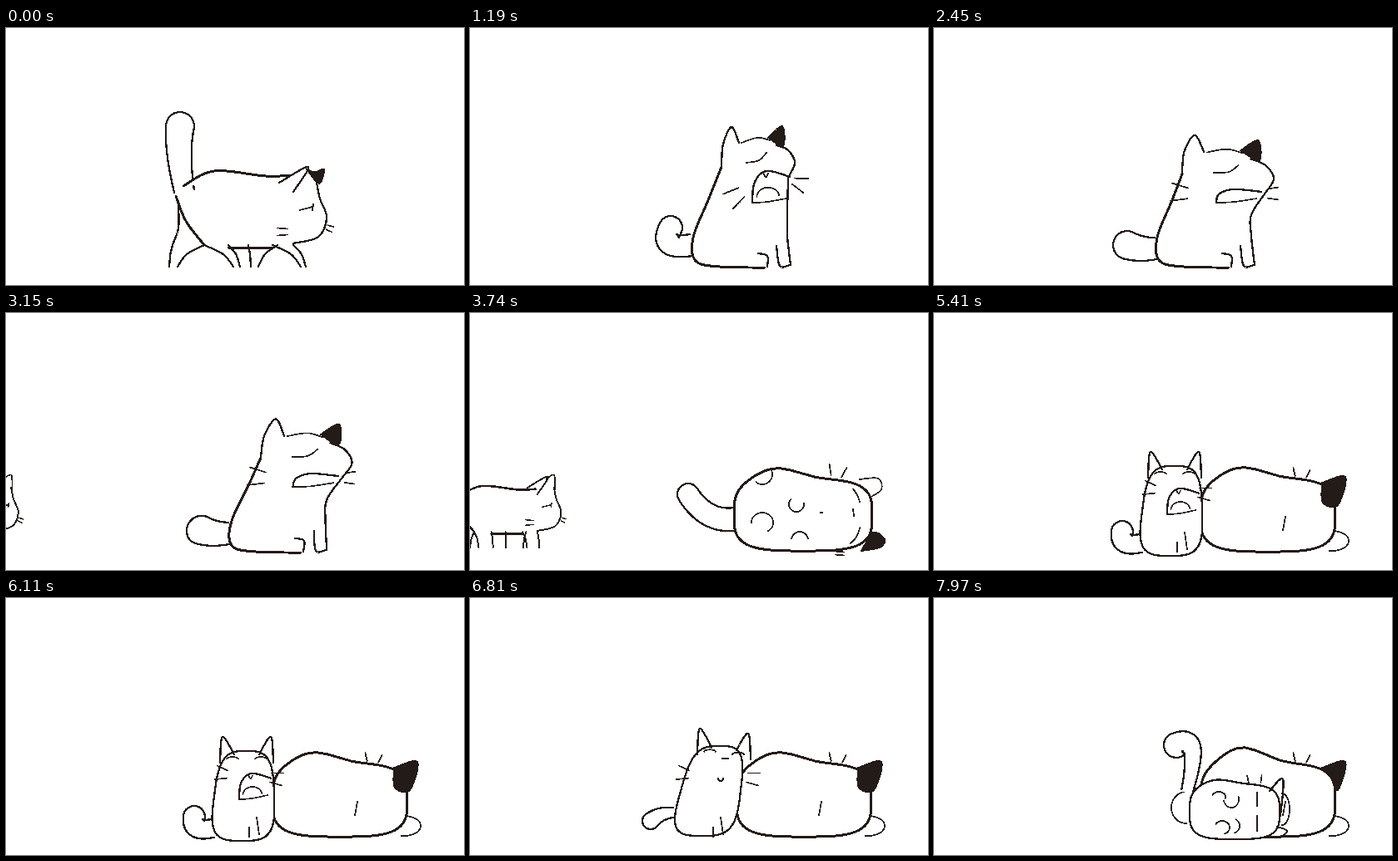
Write an HTML page that moves like this. It is 550 by 309 pixels and loops after 8000 ms.

```html
<!DOCTYPE html>
<html lang="en">
<head>
<meta charset="utf-8">
<title>Two sleepy cats</title>
<style>
html, body { margin: 0; width: 100%; height: 100%; overflow: hidden; background: #fff; }
svg { display: block; width: 100%; height: 100%; }
path { stroke: #231b18; stroke-linecap: round; stroke-linejoin: round; shape-rendering: crispEdges; }
</style>
</head>
<body>
<svg id="stage" viewBox="0 0 550 309"></svg>
<script>
const LOOP = 8000, STEP = 70, SAMPLES = 60, INK = '#231b18', FLOOR = 287;
const BOLD = 3, MID = 2.3, FINE = 1.7;
const stage = document.getElementById('stage');
const mix = (a, b, u) => a + (b - a) * u;
const rad = deg => deg * Math.PI / 180;

// A stroke is a line width plus evenly sampled points, so any two can blend
const stroke = (width, pointAt) =>
  ({ width, pts: Array.from({ length: SAMPLES + 1 }, (_, n) => pointAt(n / SAMPLES)) });

// Catmull-Rom curve through a few key points
function curve(width, ...keys) {
  const key = i => keys[Math.max(0, Math.min(keys.length - 1, i))];
  return stroke(width, v => {
    const s = v * (keys.length - 1), i = Math.min(Math.floor(s), keys.length - 2), u = s - i;
    return [0, 1].map(k => {
      const [a, b, c, d] = [-1, 0, 1, 2].map(o => key(i + o)[k]);
      return b + u / 2 * (c - a + u * (2 * a - 5 * b + 4 * c - d + u * (3 * (b - c) + d - a)));
    });
  });
}

const oval = (width, cx, cy, rx, ry, from, to) => stroke(width, u => {
  const a = rad(mix(from, to, u));
  return [cx + rx * Math.cos(a), cy + ry * Math.sin(a)];
});

// Rounded box body, drawn from the head backwards; it can lean, narrow upwards and arch its back
function loaf(width, cx, cy, rx, ry, { shear = 0, taper = 0, hump = 0 }) {
  const bulge = v => Math.sign(v) * Math.abs(v) ** .58;
  return stroke(width, u => {
    const a = rad(-45 - 360 * u), x = bulge(Math.cos(a)), up = -bulge(Math.sin(a));
    const arch = hump * Math.max(0, up) * Math.exp(-(((x + .4) / .45) ** 2));
    return [cx + rx * x * (1 - taper * up) + shear * ry * up, cy - ry * up - arch];
  });
}

// Outline of a tail: a bent spine with a rounded tip
function tube(width, base, bend, tip, baseRadius, tipRadius) {
  return stroke(width, u => {
    const s = Math.min(1, Math.min(u, 1 - u) / .4);
    const spine = k => mix(mix(base[k], bend[k], s), mix(bend[k], tip[k], s), s);
    const slope = k => mix(bend[k] - base[k], tip[k] - bend[k], s);
    const turn = rad(Math.max(-90, Math.min(90, (u - .5) * 900)));
    const a = Math.atan2(slope(1), slope(0)) + turn, r = mix(baseRadius, tipRadius, s);
    return [spine(0) + r * Math.cos(a), spine(1) + r * Math.sin(a)];
  });
}

function whiskers(side, x, y, length, angle, gap, fan = 0) {
  const pair = {};
  for (const k of [-1, 1]) {
    const n = rad(angle), a = rad(angle + k * fan);
    const cx = x - k * gap / 2 * Math.sin(n), cy = y + k * gap / 2 * Math.cos(n);
    const dx = length / 2 * Math.cos(a), dy = length / 2 * Math.sin(a);
    pair[`whisker${side}${k}`] = curve(FINE, [cx - dx, cy - dy], [cx + dx, cy + dy]);
  }
  return pair;
}

const mouth = (x, y, w, h) => ({
  mouth: curve(MID, [x, y], [x + w * .06, y - h * .64], [x + w * .38, y - h], [x + w, y - h * .82]),
  lip: curve(FINE, [x, y], [x + w * .4, y - 1], [x + w * .9, y - 5])
});
const gape = (x, y, w, h) => ({
  ...mouth(x, y, w, h),
  tongue: oval(FINE, x + w * .42, y - h * .18, w * .3, h * .3, 180, 350),
  tooth: curve(FINE, [x + w * .3, y - h * .92], [x + w * .36, y - h * .8], [x + w * .42, y - h * .92])
});

function walking() {
  const legs = {};
  // hip and paw of every leg line at full stride
  [[200, 196], [238, 206], [238, 273], [267, 281], [291, 294], [326, 303], [320, 354], [345, 360]]
    .forEach(([hip, paw], i) => {
      legs['step' + i] = curve(MID, [hip, 261], [mix(hip, paw, .65), 272], [paw, FLOOR]);
    });
  return {
    tail: tube(MID, [214, 196], [205, 150], [209, 118], 12, 17),
    body: curve(BOLD, [342, 177], [312, 178], [250, 172], [213, 190]),
    ear: curve(MID, [328, 186], [363, 167], [345, 197]),
    dark: curve(FINE, [361, 170], [371, 173], [382, 170], [376, 187], [361, 170]),
    face: curve(MID, [373, 186], [377, 205], [385, 228], [375, 251], [345, 259]),
    eye: curve(FINE, [353, 219], [368, 215]),
    pupil: curve(FINE, [369, 212], [368, 219]),
    rump: curve(BOLD, [204, 202], [216, 232], [238, 261]),
    haunch: curve(MID, [207, 214], [207, 240], [200, 261]),
    belly: curve(BOLD, [267, 264], [320, 264]),
    ...whiskers('L', 332, 245, 13, 0, 8, -5),
    ...whiskers('R', 389, 241, 7, 20, 6, 5),
    ...legs
  };
}

// The head widens and sinks as the yawn closes
function sitting(open) {
  const by = (closed, wide) => mix(closed, wide, open);
  const head = (x, y) => [by(313 + (x - 314) * 1.25, x), y + by(10 + (x - 314) * .12, 0)];
  return {
    tail: tube(MID, [266, by(265, 261)], [by(248, 226), 267], [by(232, 241), by(261, 240)], 13, by(17, 14)),
    body: curve(BOLD, head(302, 167), [286, 207], [268, 252], [271, 280], [300, 287], [354, 288]),
    ear: curve(MID, head(302, 167), head(304, 140), head(314, 119), head(323, 138)),
    crown: curve(FINE, head(326, 138), head(345, 132), head(360, 135)),
    dark: curve(FINE, head(358, 132), head(375, 118), head(376, 142), head(358, 132)),
    face: curve(MID, head(368, 141), head(382, 147), head(390, 162), head(382, 180)),
    chest: curve(MID, head(382, 180), [381, 225], [381, 250], [385, 285]),
    leg: curve(MID, [368, 262], [372, 286], [384, 285]),
    paw: curve(MID, [346, 271], [357, 274], [357, 287]),
    brow: curve(FINE, head(332, 162), head(347, 159), head(356, 150)),
    ...whiskers('L', by(295, 318), by(198, 203), 20, by(5, -34), 17, -12),
    ...whiskers('R', by(407, 396), by(199, 187), by(12, 17), by(0, 20), 13, by(8, 18)),
    ...(open === 1 ? gape : mouth)(339, 210, by(54, 45), by(16, 38))
  };
}

const onBack = {
  tail: tube(MID, [318, 248], [284, 252], [262, 218], 14, 13),
  dark: curve(FINE, [470, 286], [484, 264], [498, 272], [492, 282], [470, 286]),
  body: loaf(BOLD, 400, 243, 83, 43, { hump: 14 }),
  ear: curve(FINE, [468, 200], [490, 199], [494, 212], [480, 222]),
  foot: oval(FINE, 351, 194, 12, 12, -30, 130),
  foot2: oval(FINE, 351, 252, 13, 12, 180, 420),
  paw: oval(FINE, 392, 230, 9, 9, -10, 220),
  paw2: oval(FINE, 396, 273, 10, 10, 190, 350),
  eye: curve(FINE, [460, 236], [461, 244]),
  nose: curve(FINE, [421, 240], [423, 240]),
  cheek: oval(FINE, 450, 243, 20, 36, -60, -25),
  cheek2: oval(FINE, 450, 243, 20, 36, 25, 70),
  ...whiskers('L', 441, 190, 13, -80, 17, 19),
  ...whiskers('R', 444, 289, 10, 5, 4)
};

// Breathing in arches the back and folds the dark ear
const onSide = breath => ({
  ear: oval(FINE, 478, 274, 20, 12, -80, 100),
  body: loaf(BOLD, 401, 243, 81, 44, { hump: 14 + 6 * breath }),
  dark: curve(FINE, [466, 204], [494, 197], [485, 231], [mix(467, 476, breath), mix(228, 215, breath)], [466, 204]),
  paw: curve(FINE, [422, 245], [419, 261]),
  ...whiskers('L', 441, 192, 10, -84, 17, 20)
});

// The kitten walks like the big cat, only smaller and with a pale ear
const kittenWalk = {
  ...warp(walking(), (x, y, name) => [x * .71 - 164, y * .71 + 78 + (name === 'body' ? 8 : 0)], .85),
  dark: curve(FINE, [92, 199], [101, 195], [102, 212])
};

function kittenSitting(open) {
  const by = (smile, yawn) => mix(smile, yawn, open);
  const head = (x, y) => [by(305, 289) + x, by(177, 184) + y + x * by(.1, 0)];
  const face = {};
  for (const side of [-1, 1]) {
    face['ear' + side] = curve(MID, head(side * 32, 14), head(side * 29, -17), head(side * 15, 4));
    face['eye' + side] = oval(FINE, ...head(side * 17, 10), 7, 3, 190, 350);
  }
  return {
    tail: tube(MID, [by(244, 248), by(258, 277)], [by(228, 222), by(258, 282)],
      [by(217, 226), by(268, 263)], by(6, 11), by(10, 13)),
    body: loaf(MID, by(289, 286), by(232, 238), 36, 54, { shear: by(.2, .05), taper: .12 }),
    ...face,
    leg: curve(FINE, [292, 276], [292, FLOOR]),
    leg2: curve(FINE, [301, 264], [304, 284]),
    ...whiskers('L', by(256, 259), 211, 14, 10, 13, -15),
    ...whiskers('R', by(340, 325), 217, 15, 8, 13, 8),
    ...(open ? gape(280, 242, 38, 31) : {
      nose: curve(FINE, [303, 193], [310, 193]),
      chin: oval(FINE, 301, 217, 3, 3, 0, 180)
    })
  };
}

const kittenLying = {
  tail: tube(MID, [304, 232], [322, 160], [291, 177], 7, 15),
  thigh: oval(FINE, 303, 252, 18, 19, 90, 260),
  body: loaf(MID, 361, 257, 54, 33, { hump: 6 }),
  'ear-1': curve(MID, [403, 232], [419, 218], [416, 262]),
  ear1: oval(FINE, 418, 254, 9, 19, -90, 90),
  ear2: curve(FINE, [412, 275], [424, 280], [416, 288]),
  foot: oval(FINE, 342, 239, 8, 6, 200, 380),
  foot2: oval(FINE, 346, 276, 9, 8, 210, 430),
  paw: oval(FINE, 357, 242, 9, 10, -20, 170),
  paw2: oval(FINE, 358, 274, 9, 9, -60, 70),
  'eye-1': curve(FINE, [388, 234], [388, 250]),
  eye1: curve(FINE, [388, 262], [388, 280]),
  ...whiskers('L', 385, 218, 9, -92, 16, 10)
};

function warp(pose, move, thin = 1) {
  const out = {};
  for (const name in pose) {
    const { width, pts } = pose[name];
    out[name] = { width: width * thin, pts: pts.map(([x, y]) => move(x, y, name)) };
  }
  return out;
}
const lean = (pose, amount, stretch) =>
  warp(pose, (x, y) => [x + (FLOOR - y) * amount, FLOOR - (FLOOR - y) * stretch]);

const walk = walking(), yawn = sitting(1), grumpy = sitting(0);
const asleep = onSide(0), inhaled = onSide(1);
const kittenYawn = kittenSitting(1), kittenSmile = kittenSitting(0);

// [time, pose, horizontal shift]
const bigKeys = [
  [0, walk, 0], [600, walk, 34], [840, grumpy, 0], [1120, yawn, 0], [1820, yawn, 0],
  [2450, grumpy, 0], [3080, grumpy, 0], [3360, lean(grumpy, .45, 1.06), 0],
  [3570, onBack, 6], [3640, onBack, 0], [4500, onBack, 0], [4800, asleep, 0],
  [7200, asleep, 0], [7600, inhaled, 0], [LOOP, inhaled, 0]
];
const kittenKeys = [
  [0, kittenWalk, -200], [3000, kittenWalk, -120], [3710, kittenWalk, 0], [4210, kittenWalk, 40],
  [4850, kittenWalk, 210], [5060, kittenYawn, 0], [6200, kittenYawn, 0], [6600, kittenSmile, 0],
  [6880, kittenSmile, 0], [7180, lean(kittenSmile, .3, 1.04), 0], [7490, kittenLying, 0], [LOOP, kittenLying, 0]
];

function drawCat(keys, t, fills) {
  const next = keys.findIndex(key => key[0] > t);
  const [t0, from, dx0] = keys[next - 1], [t1, to, dx1] = keys[next];
  const raw = (t - t0) / (t1 - t0);
  const u = from === to ? raw : raw * raw * (3 - 2 * raw);
  const stride = Math.cos(t / 95);

  return Object.keys(u < .5 ? from : to).map(name => {
    const a = from[name] || to[name], b = to[name] || from[name];
    let pts = a.pts.map(([x, y], i) =>
      [mix(x + dx0, b.pts[i][0] + dx1, u), mix(y, b.pts[i][1], u)]);
    if (name.startsWith('step')) pts = pts.map(([x, y]) => [mix(pts[0][0], x, stride), y]);
    const d = pts.map(p => p.map(v => v.toFixed(1)).join(' ')).join('L');
    return `<path d="M${d}" fill="${fills[name] || 'none'}" stroke-width="${mix(a.width, b.width, u).toFixed(2)}"/>`;
  }).join('');
}

function render(now) {
  const t = Math.floor(now % LOOP / STEP) * STEP;
  const paper = { tail: '#fff', thigh: '#fff', body: '#fff' };
  stage.innerHTML = drawCat(bigKeys, t, { ...paper, dark: INK }) + drawCat(kittenKeys, t, paper);
}

const start = performance.now();
function tick() {
  render(performance.now() - start);
  requestAnimationFrame(tick);
}
tick();
</script>
</body>
</html>
```
